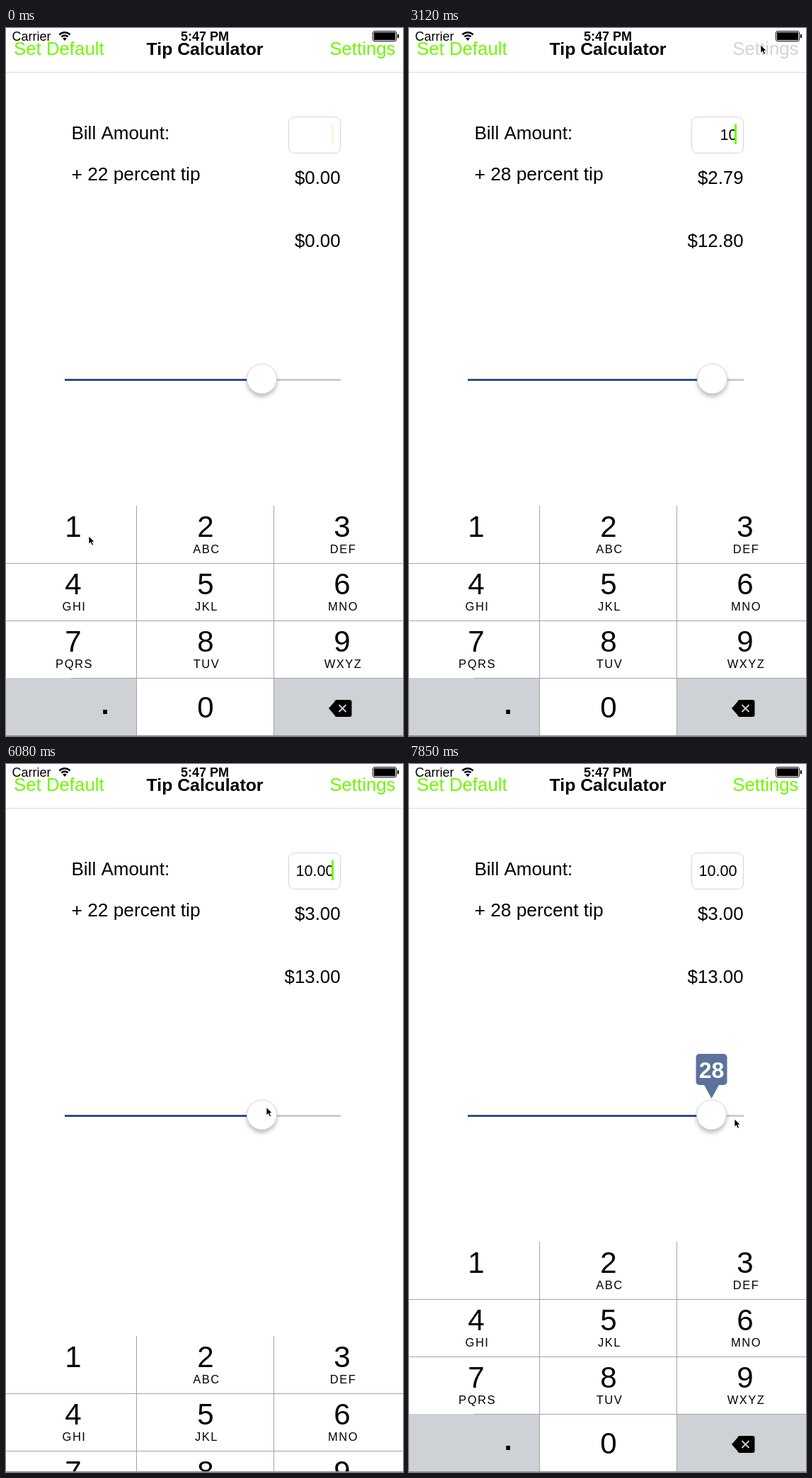
Write an HTML page with a canvas that moves like this. It is 561 px wide and 999 px high and loops after 8 s.

```html
<!DOCTYPE html>
<html lang="en">
<head>
<meta charset="utf-8">
<title>Tip Calculator</title>
<style>
html, body { margin: 0; width: 100%; height: 100%; overflow: hidden; background: #fff; }
canvas { display: block; }
</style>
</head>
<body>
<canvas id="stage" width="561" height="999"></canvas>
<script>
const W = 561, H = 999, LOOP = 8000, STEP = LOOP / 54;
const GREEN = '#6ef900', KEY_GREY = '#ced2d6', LINE = '#a3a3a5';
const ctx = document.getElementById('stage').getContext('2d');

// Moments of the story, in ms
const TYPE_1 = 140, TYPE_0 = 880, PRESS = 150;
const DRAG = 1680, DRAG_END = 2280, RELEASE = 2450;
const OPEN_SETTINGS = 3180, TOGGLE = 4420, GO_BACK = 5316;
const LOADED = 5900, KEYBOARD_UP = 5950;
const GRAB = 6370, PULL_RIGHT = 6900, PULL_END = 7850;

const clamp = v => Math.max(0, Math.min(1, v));
const ramp = (t, start, end) => clamp((t - start) / (end - start));
const smooth = (t, start, end) => {
  const p = ramp(t, start, end);
  return p * p * (3 - 2 * p);
};
const easeOut = (t, start, length) => 1 - (1 - ramp(t, start, start + length)) ** 3;

function cursorAt(t) {
  let x = 117, y = 717;
  const move = (start, end, toX, toY) => {
    const p = smooth(t, start, end);
    x += (toX - x) * p;
    y += (toY - y) * p;
  };
  move(TYPE_1, TYPE_1 + PRESS, 187, 750);
  move(590, TYPE_0, 290, 945);
  move(TYPE_0 + PRESS, DRAG, 377, 495);
  move(DRAG, DRAG_END, 473, 495);
  move(RELEASE, 2810, 497, 24);
  move(OPEN_SETTINGS, 4000, 413, 218);
  move(TOGGLE + PRESS, 5180, 76, 46);
  move(GO_BACK, 6150, 375, 495);
  move(GRAB, GRAB + PRESS, 366, 495);
  move(PULL_RIGHT, PULL_END, 460, 501);
  return [x, y];
}

function knobX(t) {
  if (t < GO_BACK) return 361 + 67 * smooth(t, DRAG, DRAG_END);
  return 361 - 11 * smooth(t, GRAB, GRAB + PRESS) + 77 * smooth(t, PULL_RIGHT, PULL_END);
}

const popupSize = t => ramp(t, DRAG, DRAG + 250) - ramp(t, RELEASE, RELEASE + 250)
  + ramp(t, GRAB + 60, GRAB + 310);

const caretAlpha = t => clamp(.5 + 3.8 * Math.sin(Math.PI * 2 * (t - 15) / 1000));

function text(str, x, y, { size = 25.8, color = '#000', align = 'left', weight = 400, spacing = 0 } = {}) {
  ctx.font = `${weight} ${size}px "Liberation Sans", Arial, sans-serif`;
  ctx.letterSpacing = spacing + 'px';
  ctx.textAlign = align;
  ctx.fillStyle = color;
  ctx.fillText(str, x, y);
}

function rect(x, y, w, h, color) {
  ctx.fillStyle = color;
  ctx.fillRect(x, y, w, h);
}

function roundRect(x, y, w, h, r) {
  ctx.beginPath();
  ctx.roundRect(x, y, w, h, r);
}

function fill(color) {
  ctx.fillStyle = color;
  ctx.fill();
}

function stroke(color, width) {
  ctx.strokeStyle = color;
  ctx.lineWidth = width;
  ctx.stroke();
}

function polygon(points, color) {
  ctx.beginPath();
  points.forEach(([x, y]) => ctx.lineTo(x, y));
  ctx.closePath();
  fill(color);
}

function at(x, y, draw) {
  ctx.save();
  ctx.translate(x, y);
  draw();
  ctx.restore();
}

function knob(x, y) {
  ctx.save();
  ctx.shadowColor = 'rgba(0,0,0,.28)';
  ctx.shadowBlur = 6;
  ctx.shadowOffsetY = 4;
  ctx.beginPath();
  ctx.arc(x, y, 21, 0, 7);
  fill('#fff');
  ctx.restore();
  stroke('#d6d6d8', 1);
}

// Grows from a small grey flag into a large blue one
function popup(x, percent, size) {
  if (size <= 0) return;
  const blue = ramp(size, .36, 1), scale = .44 + .56 * size;
  const mix = (from, to) => from + (to - from) * blue;
  const color = `rgb(${mix(205, 91)},${mix(205, 115)},${mix(207, 155)})`;
  at(x, 472, () => {
    ctx.globalAlpha = clamp(size * 3);
    ctx.scale(scale, scale);
    roundRect(-22, -63, 44, 44, 5);
    fill(color);
    polygon([[-11, -20], [11, -20], [0, 0]], color);
    text(percent, 0, -29, { size: 32, weight: 700, color: '#fff', align: 'center' });
  });
}

function mainValues(t, percent) {
  if (t >= GO_BACK) {
    if (t < LOADED) return { bill: '0.00', tip: '0.00', total: '0.00' };
    const tip = Math.ceil(percent / 10);
    return { bill: '10.00', tip: `$${tip}.00`, total: `$${10 + tip}.00`, label: true };
  }
  const bill = t < TYPE_1 ? '' : t < TYPE_0 ? '1' : '10';
  const tip = bill * percent / 100;
  return {
    bill, label: true,
    tip: '$' + Math.max(0, tip - .01).toFixed(2),
    total: '$' + (+bill + tip).toFixed(2)
  };
}

function mainScreen(t) {
  const x = knobX(t);
  const percent = Math.round((x - 104) / 347 * 30);
  const values = mainValues(t, percent);
  const pressed = t > 2960 && t < OPEN_SETTINGS + 300;

  rect(0, 0, W, H, '#fff');
  text('Set Default', 11, 38, { color: GREEN });
  text('Tip Calculator', 281, 38, { size: 24.8, weight: 700, align: 'center' });
  text('Settings', 550.5, 38, { color: pressed ? '#ccd8cc' : GREEN, align: 'right' });
  rect(0, 62, W, 1, '#d9d9d9');

  text('Bill Amount:', 92.5, 157, { size: 26 });
  roundRect(399.5, 125.5, 73, 51, 8);
  stroke('#d4d4d4', 1);
  text(values.bill, 463.5, 158, { size: 21.6, align: 'right' });
  if (t < OPEN_SETTINGS || t > KEYBOARD_UP) {
    ctx.globalAlpha = caretAlpha(t);
    rect(460, 136, 3, 28, GREEN);
    ctx.globalAlpha = 1;
  }
  if (values.label) text(`+ ${percent} percent tip`, 92.5, 215, { size: 26.3 });
  text(values.tip, 472.5, 220, { align: 'right' });
  text(values.total, 472.5, 309, { align: 'right' });

  rect(83, 495, 390, 3, '#cbcdcf');
  rect(83, 495, x - 83, 3, '#2f5085');
  knob(x + .5, 495);
  popup(x + .5, percent, popupSize(t));
}

function settingsScreen(t) {
  const on = easeOut(t, TOGGLE, 300);
  rect(0, 0, W, H, '#fff');
  text('Back', 23.5, 50, { color: '#0a7aff' });
  text('Settings', 450, 50, { size: 24.8, weight: 700, align: 'center' });
  rect(0, 74, W, 1, '#d9d9d9');
  text('Round up to nearest dollar', 80.5, 234, { size: 26 });
  roundRect(389, 203.5, 74, 43.5, 21.75);
  fill(`rgba(76,217,100,${on})`);
  stroke(on > .5 ? '#4cd964' : '#e5e5e6', 2.5);
  knob(411 + 30 * on, 225);
}

function keyboard(t) {
  const letters = ['', 'ABC', 'DEF', 'GHI', 'JKL', 'MNO', 'PQRS', 'TUV', 'WXYZ'];
  const columns = [95, 282, 475];
  const digit = { size: 42, align: 'center' };
  const held = since => t > since && t < since + PRESS;
  rect(0, 674, W, 325, '#fff');
  rect(0, 917, 184, 82, KEY_GREY);
  rect(379, 918, 182, 81, KEY_GREY);
  if (held(TYPE_1)) rect(0, 674, 184, 81, KEY_GREY);
  if (held(TYPE_0)) rect(185, 918, 193, 81, KEY_GREY);

  letters.forEach((group, i) => {
    const x = columns[i % 3], row = Math.floor(i / 3) * 81;
    text(i + 1, x, 718 + row, digit);
    text(group, x + 1.5, 741 + row, { size: 16.5, align: 'center', spacing: 1.5 });
  });
  text('0', 282, 973, digit);
  text('.', 140, 968, { size: 40, weight: 700, align: 'center' });

  for (const x of [184, 378]) rect(x, 674, 1, 325, LINE);
  for (const y of [755, 836]) rect(0, y, W, 1, LINE);
  rect(92, 917, W - 92, 1, LINE);

  at(475.5, 960, () => {
    roundRect(-11, -12, 24, 24, 3);
    fill('#000');
    polygon([[-19.5, 0], [-9, -12], [-9, 12]], '#000');
    ctx.beginPath();
    for (const side of [-5, 5]) {
      ctx.moveTo(side, -5);
      ctx.lineTo(-side, 5);
    }
    stroke(KEY_GREY, 1.8);
  });
}

function statusBar() {
  text('Carrier', 8.5, 18, { size: 18 });
  text('5:47 PM', 281, 18, { size: 18, weight: 700, align: 'center' });
  for (const radius of [6.5, 10.8]) {
    ctx.beginPath();
    ctx.arc(83, 17, radius, -Math.PI * .75, -Math.PI * .25);
    stroke('#000', 2.4);
  }
  polygon([[80, 14.5], [83, 13.4], [86, 14.5], [83, 18]], '#000');
  roundRect(518.5, 4.5, 33, 14, 2.5);
  stroke('#000', 1);
  rect(520, 6, 30, 11, '#000');
  rect(553, 9, 2, 5, '#000');
}

function cursor(x, y) {
  at(x, y, () => {
    polygon([[0, 0], [0, 11], [2.6, 8.8], [4.5, 13], [6.5, 12.2], [4.7, 8], [8, 8]], '#000');
    stroke('#fff', .7);
  });
}

function draw(t) {
  const opened = easeOut(t, OPEN_SETTINGS, 500);
  const returned = easeOut(t, GO_BACK, 500);
  const raised = t < GO_BACK ? 1 - opened : easeOut(t, KEYBOARD_UP, 480);
  const slideUp = (shown, height, part) => {
    if (shown > 0) at(0, Math.round(height * (1 - shown)), () => part(t));
  };

  if (t < GO_BACK) mainScreen(t);
  if (returned < 1) slideUp(opened, H, settingsScreen);
  slideUp(returned, H, mainScreen);
  slideUp(raised, 325, keyboard);
  statusBar();
  rect(0, 998, W, 1, '#8f8f8f');
  cursor(...cursorAt(t));
}

// The screen advances in even, held steps
const startTime = performance.now();
function frame() {
  const t = (performance.now() - startTime) % LOOP;
  draw(Math.floor((t + 2) / STEP) % 54 * STEP);
  requestAnimationFrame(frame);
}
frame();
</script>
</body>
</html>
```
